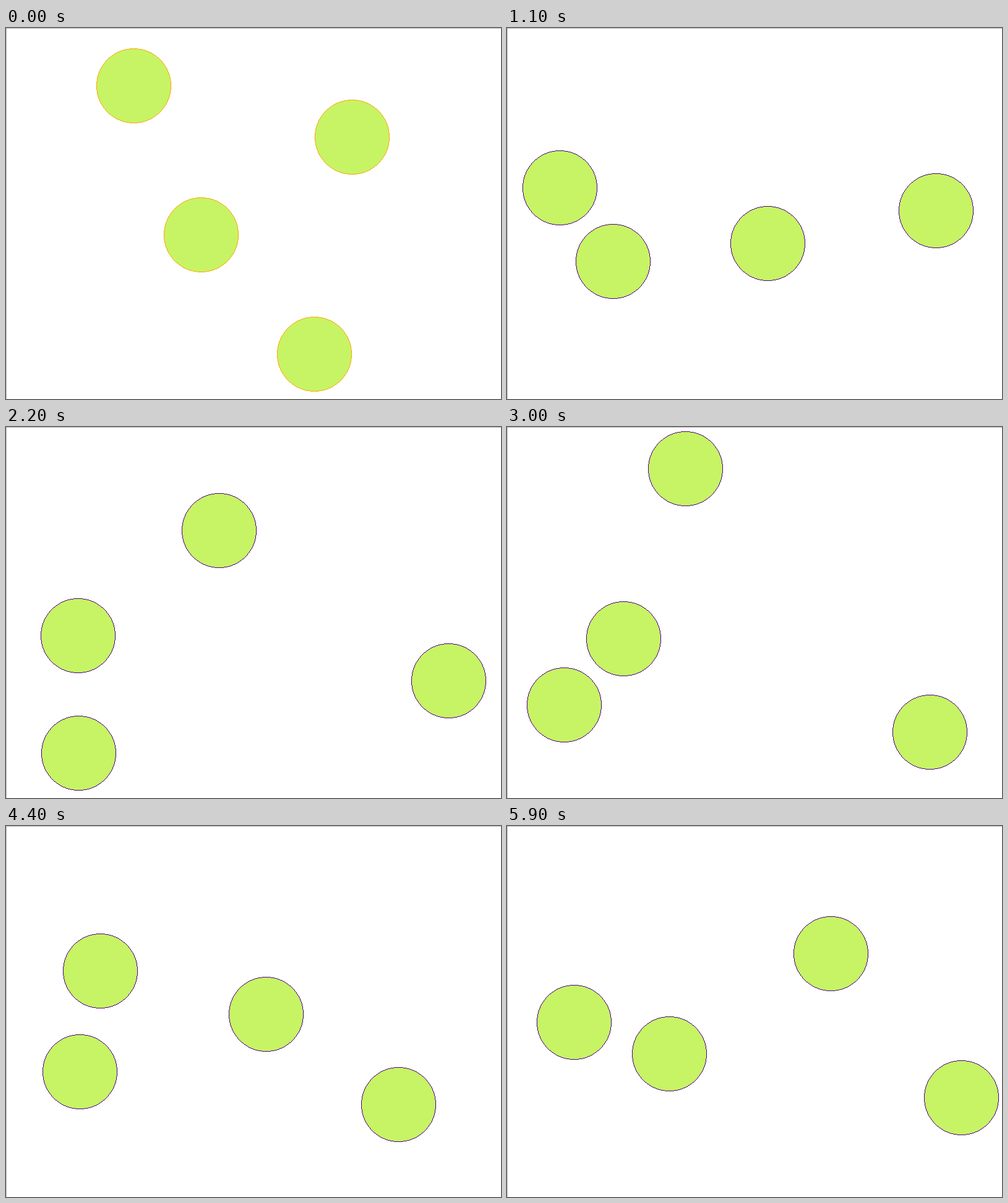
Write an HTML page that moves like this. It is 800x600 px and loops after 6000 ms.

```html
<!DOCTYPE html>
<html lang="en">
<head>
<meta charset="utf-8">
<title>Bouncing balls</title>
<style>
  html, body { margin: 0; width: 100%; height: 100%; overflow: hidden; background: #fff; }
  svg { display: block; width: 800px; height: 600px; }
</style>
</head>
<body>
<svg viewBox="0 0 800 600" shape-rendering="crispEdges">
  <defs>
    <g id="ball">
      <circle cx="0.5" cy="0.5" r="60" fill="#c7f464"/>
      <path id="rim"/>
    </g>
  </defs>
  <g id="balls"></g>
  <path d="M0 0H800V1H1V600H0Z" fill="#b4b4b4"/>
</svg>
<script>
const LOOP = 6000, STEP = 100, RADIUS = 60;

// Start, bounces and end of each ball: [step, x, y]. Speed is constant in between.
const paths = [
  [[0, 498.5, 527.5], [15, 393, 283.5], [29, 295.5, 51], [37, 238.8, 184.4],
   [52, 54.5, 291.7], [54, 79.8, 306], [59, 108, 317.5]],
  [[0, 315.5, 334.5], [14, 132, 389], [15, 126.5, 401.5], [23, 116.5, 546],
   [28, 110.6, 456.9], [34, 56.3, 434.3], [54, 182.4, 360.4], [59, 262.5, 368.5]],
  [[0, 559.5, 176.5], [15, 742.5, 338.5], [35, 664.3, 544.5], [50, 614, 387],
   [58, 749, 433.5], [59, 734.5, 439.5]],
  [[0, 206.5, 93.5], [14, 52, 303.5], [15, 65, 311.5], [28, 161.2, 360.2],
   [37, 284, 280], [50, 537, 325.7], [59, 523.5, 206.5]]
];

// One-pixel rim: eight mirrored arcs of single pixels.
function rimPath(r) {
  let d = "";
  const dot = (x, y) => { d += `M${x} ${y}h1v1h-1z`; };
  for (let a = 0; a <= r * Math.SQRT1_2; a++) {
    const b = Math.round(Math.sqrt(r * r - a * a));
    for (const p of [a, -a]) {
      for (const q of [b, -b]) {
        dot(p, q);
        dot(q, p);
      }
    }
  }
  return d;
}

const rim = document.getElementById("rim");
rim.setAttribute("d", rimPath(RADIUS));

const group = document.getElementById("balls");
const balls = paths.map(() => {
  const ball = document.createElementNS("http://www.w3.org/2000/svg", "use");
  ball.setAttribute("href", "#ball");
  return group.appendChild(ball);
});

function locate(path, step) {
  const i = Math.max(1, path.findIndex(p => p[0] >= step));
  const [s0, x0, y0] = path[i - 1], [s1, x1, y1] = path[i];
  const k = (step - s0) / (s1 - s0);
  return [x0 + (x1 - x0) * k, y0 + (y1 - y0) * k];
}

function draw(ms) {
  const step = Math.floor((ms % LOOP) / STEP);
  rim.setAttribute("fill", step ? "#4b0082" : "#ffa500");
  balls.forEach((ball, i) => {
    const [x, y] = locate(paths[i], step).map(Math.floor);
    ball.setAttribute("x", x);
    ball.setAttribute("y", y);
  });
}

const start = performance.now();
function tick() {
  draw(performance.now() - start);
  requestAnimationFrame(tick);
}
tick();
</script>
</body>
</html>
```
